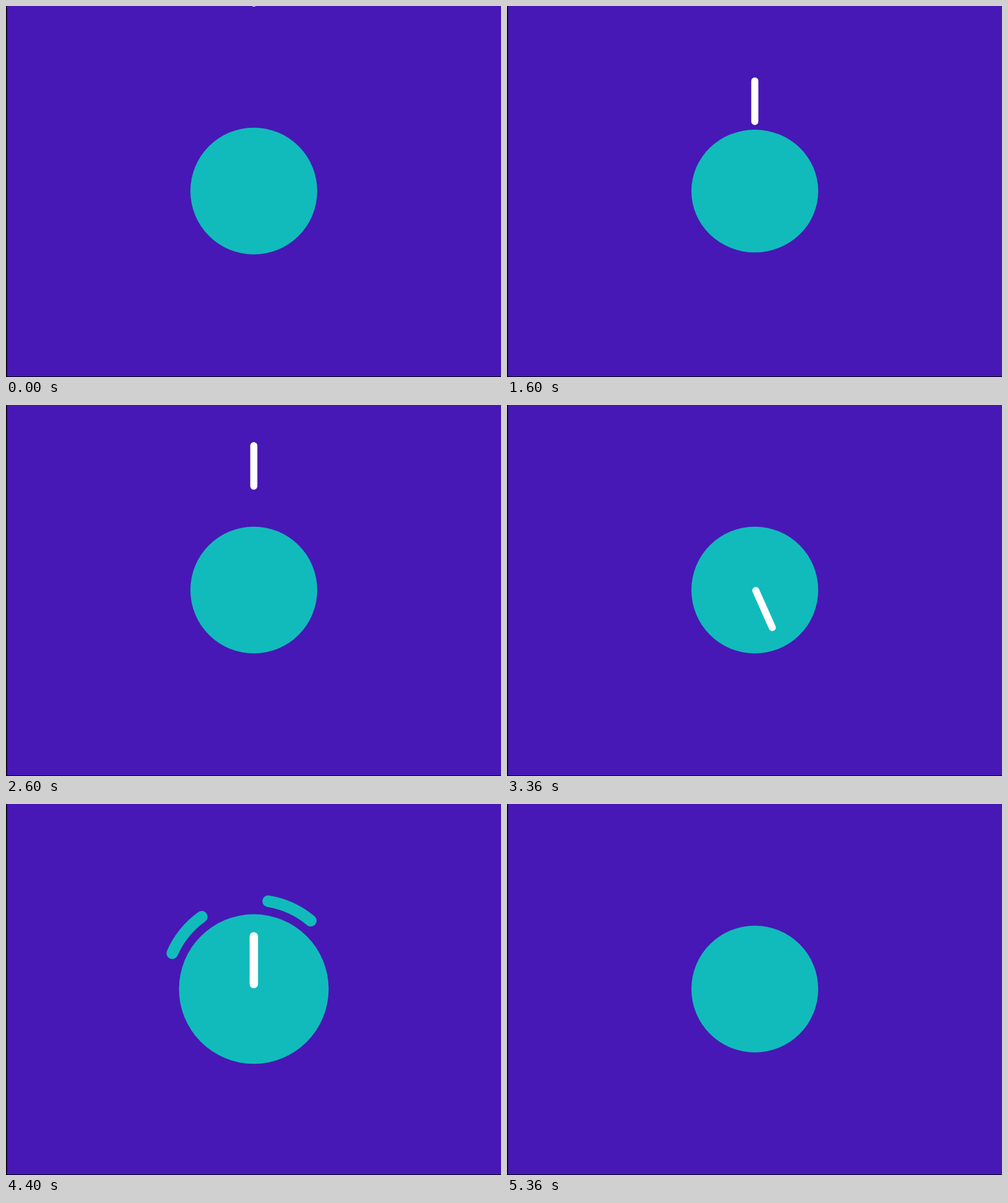
Write an HTML page with a canvas that moves like this. It is 800x600 px and loops after 5.52 s.

```html
<!DOCTYPE html>
<html lang="en">
<head>
<meta charset="utf-8">
<title>Alarm clock loop</title>
<style>
html, body { margin: 0; width: 100%; height: 100%; overflow: hidden; background: #4718b5; }
canvas { display: block; width: 800px; height: 600px; }
</style>
</head>
<body>
<canvas id="stage" width="800" height="600"></canvas>
<script>
const ctx = document.getElementById('stage').getContext('2d');
const LOOP = 5520, STEP = 40;
const PURPLE = '#4718b5', TEAL = '#11bbbb', WHITE = '#fff';
const CX = 400.5, CY = 299.3, RADIUS = 102.5;
const STICK = { length: 77, width: 11.5, restBottom: 298.2, pivotY: 296.4 };
const BELL = { radius: 122, width: 16, from: 22.5, to: 53 };
const GRAVITY = 0.00055, LANDED = 2942, SPUN = 4298, GONE = 5000;
const SQUASHES = [{ start: 580, end: 898 }, { start: 1580, end: 1926 }];

const rad = deg => deg * Math.PI / 180;
const clamp = v => Math.min(1, Math.max(0, v));
const progress = (t, a, b) => clamp((t - a) / (b - a));
const hump = p => Math.sin(Math.PI * p);
const easeInOut = p => (1 - Math.cos(Math.PI * p)) / 2;
const backOut = p => 1 + 2.55 * (p - 1) ** 3 + 1.55 * (p - 1) ** 2;

const squash = t => SQUASHES.reduce((sum, s) => sum + 18 * hump(progress(t, s.start, s.end)), 0);

function freeFall(t) {
  const arc = (peak, time) => peak + GRAVITY * (t - time) ** 2;
  if (t < 740) return arc(1, 0);
  if (t < 1780) return arc(127, 1255);
  return arc(101, 2344);
}

function stickBottom(t) {
  const y = freeFall(t);
  return t < 1980 ? Math.min(y, CY - RADIUS + squash(t)) : Math.min(y, STICK.restBottom);
}

function stroke(color, width) {
  ctx.strokeStyle = color;
  ctx.lineWidth = width;
  ctx.lineCap = ctx.lineJoin = 'round';
  ctx.stroke();
}

function drawStick(t) {
  if (t >= GONE) return;
  const spin = 720 * easeInOut(progress(t, LANDED, SPUN));
  const size = 1 - progress(t, 4600, GONE) ** 2;
  const bend = SQUASHES.reduce((sum, s) => sum + 5 * hump(progress(t, s.start + 20, s.end)), 0);
  const cap = STICK.width / 2;
  const bottom = stickBottom(t) - STICK.pivotY - cap;
  const top = bottom + 2 * cap - STICK.length + bend;
  ctx.save();
  ctx.translate(CX, STICK.pivotY);
  ctx.rotate(rad(spin));
  ctx.scale(size, size);
  ctx.beginPath();
  ctx.moveTo(0, top);
  ctx.lineTo(-bend, (top + bottom) / 2);
  ctx.lineTo(0, bottom);
  stroke(WHITE, STICK.width);
  ctx.restore();
}

function drawBells(t) {
  if (t <= 3400 || t >= GONE) return;
  const size = t < 4500 ? backOut(progress(t, 3400, 4000)) : backOut(1 - progress(t, 4560, GONE));
  if (size <= 0) return;
  const swing = -16 * Math.cos(2 * Math.PI * (t - 4380) / 210)
    * progress(t, 3960, 4200) * (1 - progress(t, 4500, 4720));
  ctx.save();
  ctx.translate(CX, CY);
  ctx.rotate(rad(swing));
  for (const side of [-1, 1]) {
    ctx.save();
    ctx.scale(side * size, size);
    ctx.beginPath();
    ctx.arc(0, 0, BELL.radius, rad(BELL.from - 90), rad(BELL.to - 90));
    stroke(TEAL, BELL.width);
    ctx.restore();
  }
  ctx.restore();
}

function drawFace(t) {
  ctx.fillStyle = TEAL;
  ctx.beginPath();
  ctx.ellipse(CX, CY, RADIUS, RADIUS - squash(t), 0, 0, 2 * Math.PI);
  ctx.fill();
}

function drawBackdrop() {
  ctx.fillStyle = PURPLE;
  ctx.fillRect(0, 0, 800, 600);
  ctx.fillStyle = '#000';
  ctx.fillRect(0, 0, 1.6, 600);
  ctx.fillRect(0, 599, 800, 1);
}

function draw(t) {
  drawBackdrop();
  const pulse = 1 + 0.2 * clamp(1 - Math.abs(t - 4360) / 400);
  ctx.save();
  ctx.translate(CX, CY);
  ctx.scale(pulse, pulse);
  ctx.translate(-CX, -CY);
  drawBells(t);
  drawFace(t);
  drawStick(t);
  ctx.restore();
}

const origin = performance.now();
function tick() {
  const elapsed = Math.max(0, performance.now() - origin) % LOOP;
  draw(Math.floor(elapsed / STEP) * STEP);
  requestAnimationFrame(tick);
}
tick();
</script>
</body>
</html>
```
